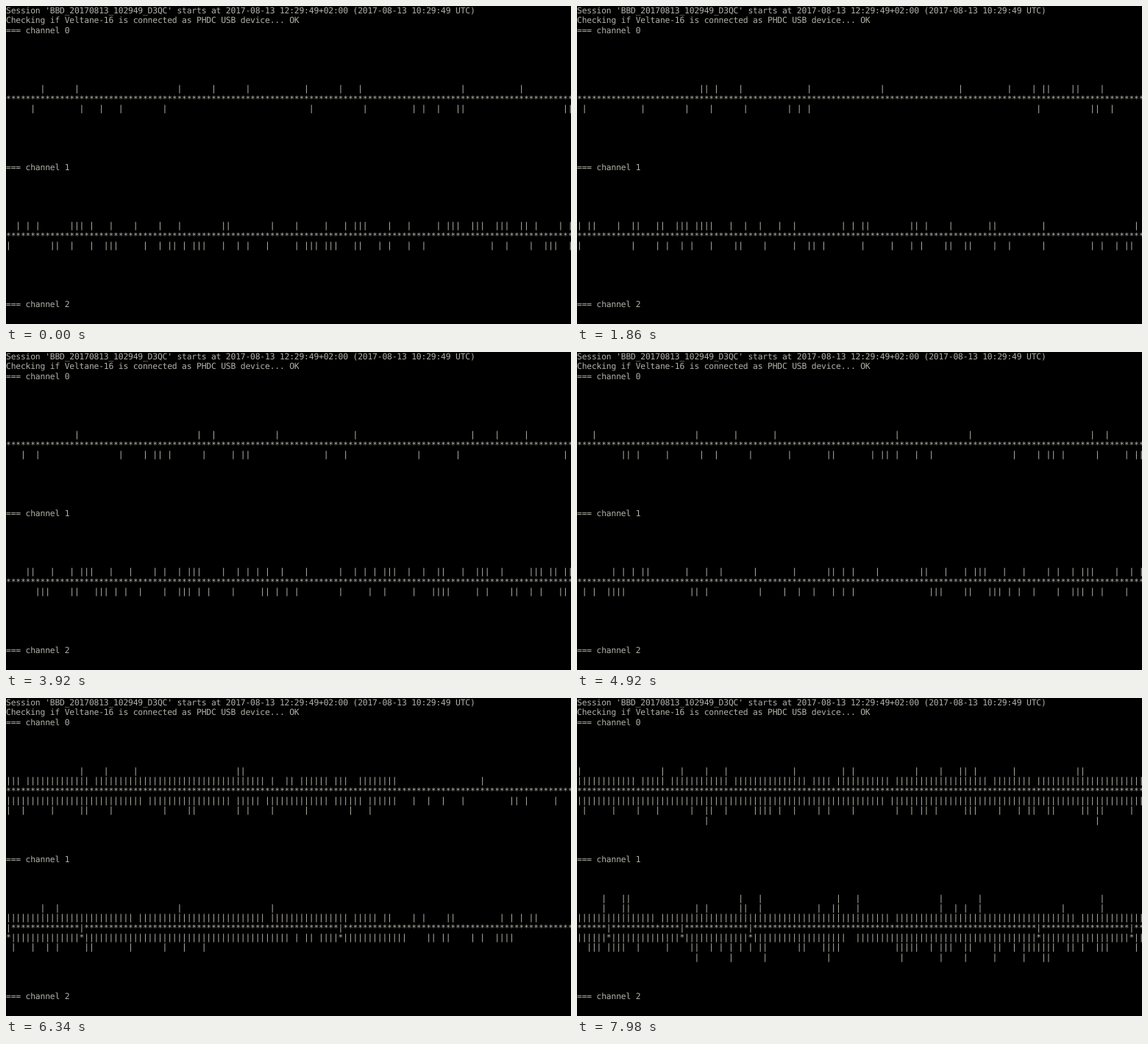
Write an HTML page that moves like this. It is 768 by 432 pixels and loops after 8 s.

```html
<!DOCTYPE html>
<html lang="en">
<head>
<meta charset="utf-8">
<title>Channel monitor</title>
<style>
  html, body { margin: 0; width: 100%; height: 100%; overflow: hidden; background: #000; }
  svg { display: block; width: 768px; height: 432px; background: #000; }
  text {
    font-family: "DejaVu Sans Mono", monospace;
    font-size: 11.39px;
    letter-spacing: -0.207px;
    fill: #b2b0a6;
    white-space: pre;
    text-rendering: geometricPrecision;
  }
</style>
</head>
<body>
<svg id="stage" viewBox="0 0 768 432"></svg>
<script>
const LOOP = 8000, REFRESH = 140;   // ms
const LINE = 13.286, BASE = 10.2;   // terminal rows, px
const COLS = 116, SPEED = 9.4;      // columns moved per refresh
const ONSET = 459;                  // signal column where activity starts
const REACH = 3;                    // rows used above and below zero

// Chances per side of a channel: a spike at rest, and two or three rows when active.
const sides = [
  { above: { rest: 0.11, two: 0.15, three: 0 }, below: { rest: 0.16, two: 0.29, three: 0.01 } },
  { above: { rest: 0.33, two: 0.13, three: 0.05 }, below: { rest: 0.32, two: 0.37, three: 0.04 } }
];

function rand(n, seed) {
  const v = Math.sin(n * 12.9898 + seed * 78.233) * 43758.5453;
  return v - Math.floor(v);
}

// Eases from 0 to 1 over `span` columns after `from`.
function ramp(p, from, span) {
  return Math.min(1, Math.max(0, (p - from) / span));
}

function extent(ch, h, p) {
  const side = h > 0 ? "above" : "below";
  const { rest, two, three } = sides[ch][side];
  const seed = 1 + ch * 2 + (h > 0 ? 0 : 1);
  if (rand(p, seed + 20) < three * ramp(p, 540, 1)) return 3;
  if (rand(p, seed + 10) < two * ramp(p, ONSET, 90)) return 2;
  const chance = p < ONSET ? rest : 0.78 + 0.18 * ramp(p, ONSET, 35);
  return rand(p, seed) < chance ? 1 : 0;
}

// Channel 1 now and then sinks one row once it is active.
function meanRow(ch, p) {
  return ch === 1 && p > ONSET && rand(p, 40) < 0.022 ? -1 : 0;
}

function glyph(ch, h, p) {
  if (h === meanRow(ch, p)) return "*";
  return h === 0 || Math.abs(h) <= extent(ch, h, p) ? "|" : "\u00a0";
}

const stage = document.getElementById("stage");
function addLine(row, content = "") {
  const el = document.createElementNS("http://www.w3.org/2000/svg", "text");
  el.setAttribute("x", 0);
  el.setAttribute("y", BASE + row * LINE);
  el.textContent = content;
  stage.appendChild(el);
  return el;
}

addLine(0, "Session 'BBD_20170813_102949_D3QC' starts at 2017-08-13 12:29:49+02:00 (2017-08-13 10:29:49 UTC)");
addLine(1, "Checking if Veltane-16 is connected as PHDC USB device... OK");
for (let ch = 0; ch < 3; ch++) addLine(2 + ch * 14, "=== channel " + ch);

const rows = [];
for (let ch = 0; ch < 2; ch++) {
  for (let h = REACH; h >= -REACH; h--) rows.push({ ch, h, el: addLine(9 + ch * 14 - h) });
}

let shown = -1;
function draw(ms) {
  const tick = Math.floor((ms % LOOP) / REFRESH);
  if (tick === shown) return;
  shown = tick;
  const newest = COLS - 1 + Math.round(tick * SPEED);
  for (const { ch, h, el } of rows) {
    let line = "";
    for (let c = 0; c < COLS; c++) line += glyph(ch, h, newest - c);
    el.textContent = line;
  }
}

const start = performance.now();
function loop() {
  draw(performance.now() - start);
  requestAnimationFrame(loop);
}
loop();
</script>
</body>
</html>
```
